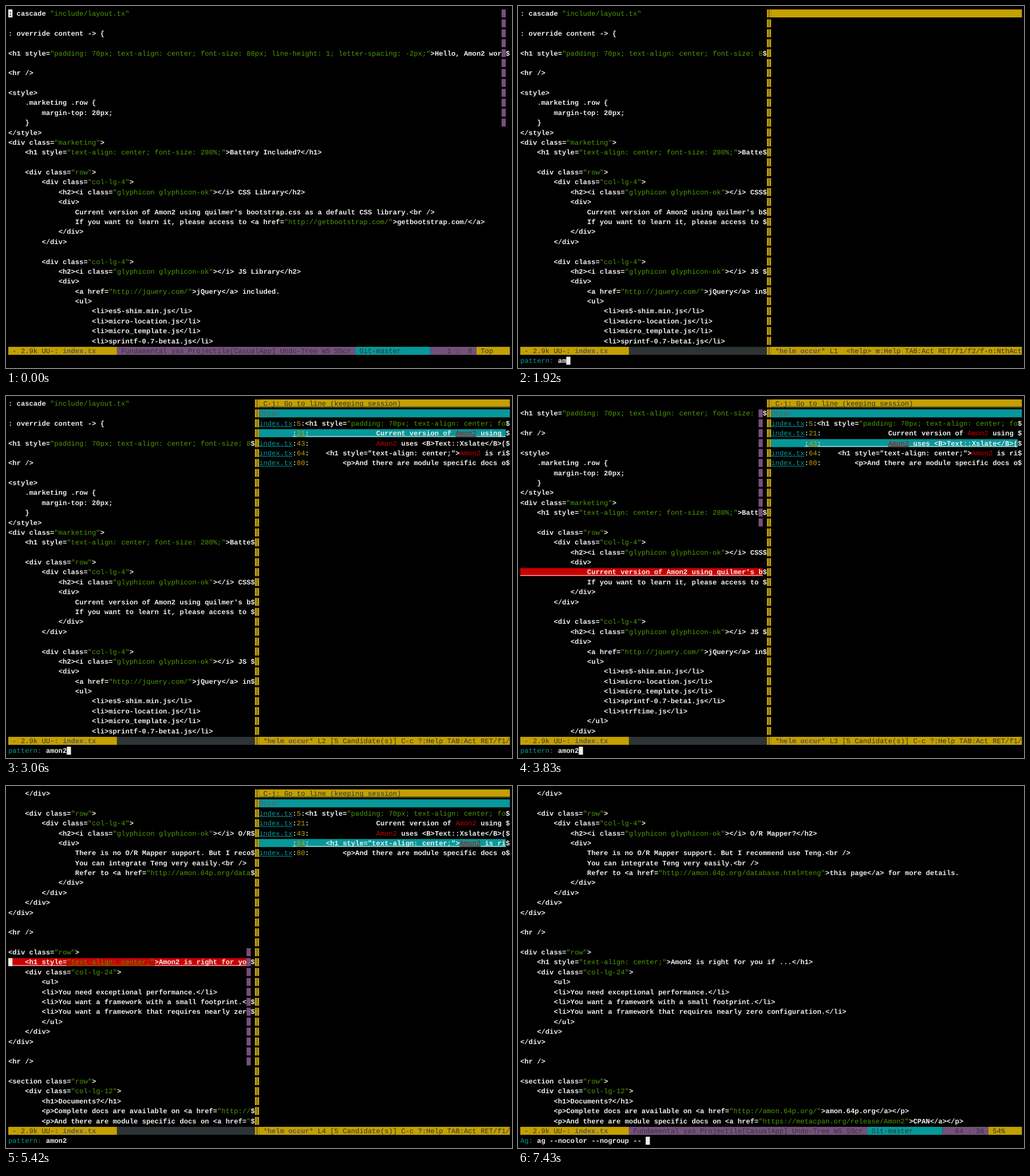
Recreate the animation shown at these times as an HTML page. Size 884 by 634 pixels, loop 8 s.

```html
<!DOCTYPE html>
<html lang="en">
<head>
<meta charset="utf-8">
<title>Editor search session</title>
<style>
html, body { margin: 0; width: 100%; height: 100%; overflow: hidden; background: #000; }
svg { display: block; width: 884px; height: 634px; }
text { font: 12.17px "Liberation Mono", "Courier New", monospace; text-rendering: geometricPrecision; white-space: pre; }
.b { font-weight: bold; }
</style>
</head>
<body>
<svg id="stage" viewBox="0 0 884 634" xmlns="http://www.w3.org/2000/svg"></svg>
<script>
const WHITE = '#eeeeec', GREEN = '#4e9a06', RED = '#cc0000', CYAN = '#06989a',
      YELLOW = '#c4a000', PURPLE = '#75507b', DARK = '#2e3436', GREY = '#555753';
const LOOP = 8000, CW = 7.303, RH = 17.38, X0 = 4, Y0 = 6, BOX = 14;
const ROWS = 34, COLS = 120, SPLIT = 59, MID = 17, TOTAL = 98;

const LINES = `: cascade "include/layout.tx"

: override content -> {

<h1 style="padding: 70px; text-align: center; font-size: 80px; line-height: 1; letter-spacing: -2px;">Hello, Amon2 world!</h1>

<hr />

<style>
    .marketing .row {
        margin-top: 20px;
    }
</style>
<div class="marketing">
    <h1 style="text-align: center; font-size: 280%;">Battery Included?</h1>

    <div class="row">
        <div class="col-lg-4">
            <h2><i class="glyphicon glyphicon-ok"></i> CSS Library</h2>
            <div>
                Current version of Amon2 using quilmer's bootstrap.css as a default CSS library.<br />
                If you want to learn it, please access to <a href="http://getbootstrap.com/">getbootstrap.com/</a>
            </div>
        </div>

        <div class="col-lg-4">
            <h2><i class="glyphicon glyphicon-ok"></i> JS Library</h2>
            <div>
                <a href="http://jquery.com/">jQuery</a> included.
                <ul>
                    <li>es5-shim.min.js</li>
                    <li>micro-location.js</li>
                    <li>micro_template.js</li>
                    <li>sprintf-0.7-beta1.js</li>
                    <li>strftime.js</li>
                </ul>
            </div>
        </div>

        <div class="col-lg-4">
            <h2><i class="glyphicon glyphicon-ok"></i> Template Engine</h2>
            <div>
                Amon2 uses <B>Text::Xslate</B>(Kolon) as a template engine.
                But you can use any template engine easily.
            </div>
        </div>
    </div>

    <div class="row">
        <div class="col-lg-4">
            <h2><i class="glyphicon glyphicon-ok"></i> O/R Mapper?</h2>
            <div>
                There is no O/R Mapper support. But I recommend use Teng.<br />
                You can integrate Teng very easily.<br />
                Refer to <a href="http://amon.64p.org/database.html#teng">this page</a> for more details.
            </div>
        </div>
    </div>
</div>

<hr />

<div class="row">
    <h1 style="text-align: center;">Amon2 is right for you if ...</h1>
    <div class="col-lg-24">
        <ul>
        <li>You need exceptional performance.</li>
        <li>You want a framework with a small footprint.</li>
        <li>You want a framework that requires nearly zero configuration.</li>
        </ul>
    </div>
</div>

<hr />

<section class="row">
    <div class="col-lg-12">
        <h1>Documents?</h1>
        <p>Complete docs are available on <a href="http://amon.64p.org/">amon.64p.org</a></p>
        <p>And there are module specific docs on <a href="https://metacpan.org/release/Amon2">CPAN</a></p>`.split('\n');

// Timeline in ms
const KEYS = [1770, 1853, 1937, 2103, 2540];
const PICKS = [3060, 3830, 5150];
const JUMPS = [
  { at: 3210, line: 21, cursorEnd: 3470, barEnd: 4140 },
  { at: 4140, line: 43, cursorEnd: 4390, barEnd: 4810 },
  { at: 5420, line: 64, cursorEnd: 5680, barEnd: 6010 }
];

let out;
const esc = s => s.replace(/&/g, '&amp;').replace(/</g, '&lt;').replace(/>/g, '&gt;');
const px = col => +(X0 + col * CW).toFixed(2);
const py = row => +(Y0 + row * RH).toFixed(2);
const past = (times, t) => times.filter(v => t >= v).length;

function rect(x, y, w, h, fill) {
  out += `<rect x="${x}" y="${y}" width="${w.toFixed(2)}" height="${h}" fill="${fill}"/>`;
}

function fill(row, col, n, color) {
  rect(px(col), py(row), n * CW, BOX, color);
}

// Writes text on the cell grid and returns the next column
function put(row, col, s, fg = WHITE, o = {}) {
  if (o.bg) fill(row, col, s.length, o.bg);
  if (o.u) rect(px(col), py(row) + 12.3, s.length * CW, 1, fg);
  const bold = o.b || fg === WHITE ? ' class="b"' : '';
  for (const m of s.matchAll(/\S+/g))
    out += `<text${bold} x="${px(col + m.index)}" y="${py(row) + 11}" fill="${fg}">${esc(m[0])}</text>`;
  return col + s.length;
}

// Colours the parts of s that match the captured pattern
function tinted(row, col, s, re, color, o) {
  s.split(re).forEach((part, i) => {
    if (part) col = put(row, col, part, i % 2 ? color : WHITE, o);
  });
}

function clipped(row, col, s, width, re, color, o) {
  const long = s.length > width;
  tinted(row, col, long ? s.slice(0, width - 1) : s, re, color, o);
  if (long) put(row, col + width - 1, '$');
}

const STRINGS = /("[^"]*"?)/;

function buffer(top, width, marked, bar) {
  for (let r = 0; r < ROWS; r++) {
    const n = top + r;
    clipped(r, 0, LINES[n - 1] || '', width, STRINGS, GREEN, n === marked ? { bg: RED, u: 1 } : {});
  }
  if (!bar) return;
  const first = Math.round((top - 1) * ROWS / TOTAL);
  for (let r = first; r < first + 12; r++) fill(r, width - 2, 1, PURPLE);
}

function cursor(row, col, ch = '') {
  fill(row, col, 1, WHITE);
  if (ch) put(row, col, ch, '#000', { b: 1 });
}

function fileStatus() {
  fill(ROWS, 0, 26, YELLOW);
  put(ROWS, 1, '- 2.9k UU-:', DARK);
  put(ROWS, 13, 'index.tx', GREY, { b: 1 });
}

function fullStatus(line, col, place) {
  fileStatus();
  fill(ROWS, 26, 57, PURPLE);
  put(ROWS, 27, 'Fundamental yas Projectile[CasualApp] Undo-Tree WS SScr', DARK);
  fill(ROWS, 83, 18, CYAN);
  put(ROWS, 84, 'Git-master', DARK);
  fill(ROWS, 101, 11, PURPLE);
  put(ROWS, 104, `${String(line).padStart(2)} : ${String(col).padStart(2)}`, DARK);
  fill(ROWS, 112, 8, YELLOW);
  put(ROWS, 113, place, DARK);
}

function candidate(row, n, selected, pattern) {
  const o = selected ? { u: 1 } : {};
  const num = String(n), start = SPLIT + 1;
  if (selected) fill(row, start, 59, CYAN);
  let col = put(row, start, 'index.tx', CYAN, { u: 1 });
  col = put(row, col, ':', WHITE, o);
  col = put(row, col, num, YELLOW, o);
  col = put(row, col, ':', WHITE, o);
  const quoted = n === 5;
  clipped(row, col, LINES[n - 1], COLS - col,
    quoted ? STRINGS : new RegExp(`(${pattern})`, 'i'), quoted ? GREEN : RED, o);
}

function helm(t, pattern) {
  const found = t < 2270 ? [] : t < 2580 ? [5, 21, 43, 55, 64, 79, 80] : [5, 21, 43, 64, 80];
  const pick = past(PICKS, t), start = SPLIT + 1;
  fill(0, start, 60, YELLOW);
  fill(ROWS, start, 60, YELLOW);
  for (let r = 0; r <= ROWS; r++) {
    fill(r, SPLIT, 1, YELLOW);
    rect(px(SPLIT) + 3.3, py(r), 1, BOX, DARK);
  }
  put(ROWS, 61, '*helm occur*', GREY, { b: 1 });
  put(ROWS, 74, `L${pick + 1} ` + (found.length
    ? `[${found.length} Candidate(s)] C-c ?:Help TAB:Act RET/f1/`
    : ' <help> m:Help TAB:Act RET/f1/f2/f-n:NthAct'), DARK);
  if (!found.length) return;
  put(0, start, ' C-j: Go to line (keeping session)'.padEnd(60), DARK, { u: 1 });
  fill(1, start, 60, CYAN);
  put(1, start, 'Occur', '#6b5350');
  found.forEach((n, i) => candidate(i + 2, n, i === pick, t < 2580 ? 'amon' : 'amon2'));
}

function splitView(t) {
  const jump = JUMPS.filter(j => t >= j.at).pop();
  const pattern = 'amon2'.slice(0, past(KEYS, t));
  if (jump) buffer(jump.line - MID, SPLIT, jump.line, t < jump.barEnd);
  else buffer(1, SPLIT);
  fileStatus();
  fill(ROWS, 26, 33, DARK);
  helm(t, pattern);
  put(ROWS + 1, 0, 'pattern:', pattern ? CYAN : '#4b6585');
  put(ROWS + 1, 9, pattern);
  if (jump && t < jump.cursorEnd) cursor(MID, 0);
  else cursor(ROWS + 1, 9 + pattern.length);
}

function render(t) {
  out = '';
  if (t < 1160) {
    buffer(1, COLS, 0, t < 420);
    fullStatus(1, 0, 'Top');
    cursor(0, 0, ':');
  } else if (t < 6010) {
    splitView(t);
  } else {
    const marked = t < 6290;
    buffer(64 - MID, COLS, marked ? 64 : 0, t < 6740);
    fullStatus(64, marked ? 0 : 36, '54%');
    if (marked) cursor(MID, 0);
    else if (t < 7430) cursor(MID, 36, 'A');
    else {
      put(ROWS + 1, 0, 'Ag:', CYAN);
      put(ROWS + 1, 4, 'ag --nocolor --nogroup --');
      cursor(ROWS + 1, 30);
    }
  }
  return out;
}

const stage = document.getElementById('stage');
const begin = performance.now();
let shown = '';

function tick() {
  const next = render((performance.now() - begin) % LOOP);
  if (next !== shown) stage.innerHTML = shown = next;
  requestAnimationFrame(tick);
}
tick();
</script>
</body>
</html>
```
